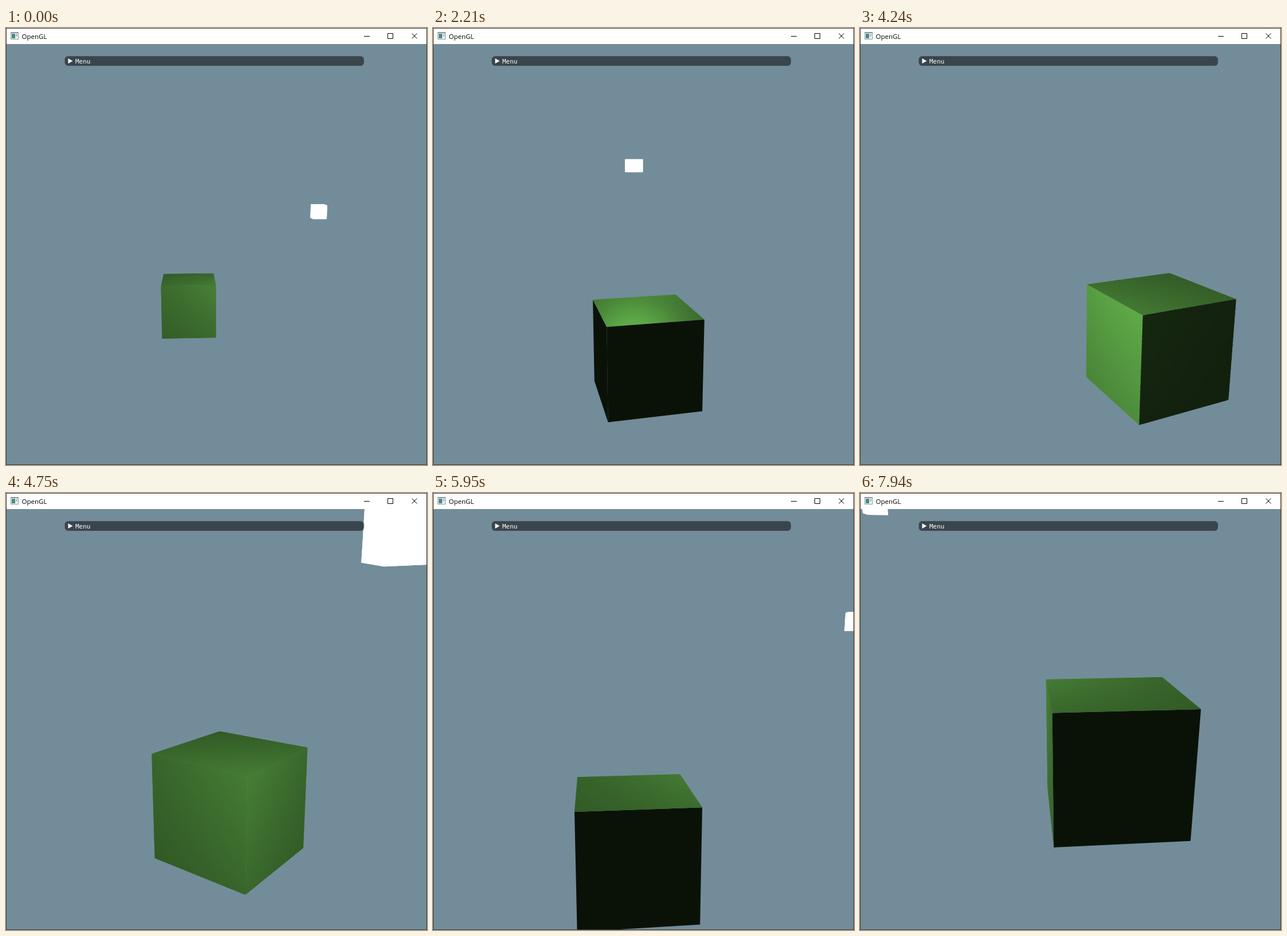
An HTML page with a canvas that plays this animation: 735 px wide and 762 px high, repeating every 7990 ms.

```html
<!DOCTYPE html>
<html>
<head>
<meta charset="utf-8">
<title>OpenGL</title>
<style>
  html, body { margin: 0; width: 100%; height: 100%; overflow: hidden; }
  canvas { display: block; }
</style>
</head>
<body>
<canvas id="stage" width="735" height="762"></canvas>
<script>
const ctx = document.getElementById('stage').getContext('2d');
const LOOP = 7.99, RAD = Math.PI / 180;
const FOCAL = 366.5 / Math.tan(22.5 * RAD), CENTER_X = 367.5, CENTER_Y = 394.5;
const COLOR = [102, 184, 78];
const PATCHES = 22;

// Camera flight: time (s), x, z, height, yaw and pitch (degrees)
const FLIGHT = [
  [0, 0.04, -9.47, 2.776, -3, 10.7],
  [0.85, -0.66, -7.2, 2.42, -4.3, 10.6],
  [1.66, -1.1, -5.35, 2.12, -9.5, 10.5],
  [2.21, -1.233, -5.154, 2.09, -13.28, 10.54],
  [2.44, -1.25, -5.13, 2.09, -16.3, 10.7],
  [2.85, -1.3, -5.1, 2.09, -4.2, 12.5],
  [3.25, -1.33, -5.08, 2.09, -11.5, 13.4],
  [3.54, -1.362, -5.063, 2.089, -12.7, 13.4],
  [4, -2.3, -4.3, 2, -16.9, 13],
  [4.75, -3.566, -2.513, 1.785, -53.1, 12.89],
  [4.88, -3.75, -2, 1.79, -57, 11.2],
  [5.05, -3.95, -1.4, 1.8, -59.8, 9.7],
  [5.35, -4.15, -0.6, 1.81, -88.9, 9],
  [5.7, -4.25, 0.1, 1.815, -91, 9],
  [5.95, -4.271, 0.365, 1.815, -96.03, 9.04],
  [6.4, -4.8, 0.8, 1.93, -104, 10],
  [6.92, -5.474, 1.381, 2.071, -107.4, 16.43],
  [7.38, -4.6, 1.05, 1.75, -100.1, 17.8],
  [7.65, -4.1, 0.85, 1.58, -93.2, 17.3],
  [7.94, -3.684, 0.662, 1.441, -95.06, 17.17]
];

const slope = (i, c) =>
  (FLIGHT[i + 1][c] - FLIGHT[i][c]) / (FLIGHT[i + 1][0] - FLIGHT[i][0]);

// Harmonic mean of neighbouring slopes keeps the curve free of overshoot
function tangent(i, c) {
  if (i === 0) return slope(0, c);
  if (i === FLIGHT.length - 1) return slope(i - 1, c);
  const a = slope(i - 1, c), b = slope(i, c);
  return a * b <= 0 ? 0 : 2 * a * b / (a + b);
}

function cameraAt(time) {
  const last = FLIGHT.length - 1;
  const t = Math.min(time, FLIGHT[last][0]);
  let i = 0;
  while (i < last - 1 && FLIGHT[i + 1][0] <= t) i++;
  const span = FLIGHT[i + 1][0] - FLIGHT[i][0];
  const u = (t - FLIGHT[i][0]) / span, v = 1 - u;
  const [x, z, height, yaw, pitch] = [1, 2, 3, 4, 5].map(c =>
    FLIGHT[i][c] * v * v * (1 + 2 * u) + FLIGHT[i + 1][c] * u * u * (3 - 2 * u) +
    span * u * v * (tangent(i, c) * v - tangent(i + 1, c) * u));
  return {
    position: [x, height, z],
    cosYaw: Math.cos(yaw * RAD), sinYaw: Math.sin(yaw * RAD),
    cosPitch: Math.cos(pitch * RAD), sinPitch: Math.sin(pitch * RAD)
  };
}

function project(camera, p) {
  const [x, y, z] = camera.position;
  const dx = p[0] - x, down = y - p[1], dz = p[2] - z;
  const right = dx * camera.cosYaw + dz * camera.sinYaw;
  const ahead = dz * camera.cosYaw - dx * camera.sinYaw;
  const depth = Math.max(0.05, down * camera.sinPitch + ahead * camera.cosPitch);
  return [
    CENTER_X + FOCAL * right / depth,
    CENTER_Y + FOCAL * (down * camera.cosPitch - ahead * camera.sinPitch) / depth
  ];
}

const subtract = (a, b) => a.map((v, i) => v - b[i]);
const dot = (a, b) => a[0] * b[0] + a[1] * b[1] + a[2] * b[2];
const unit = a => a.map(v => v / Math.hypot(...a));

function tracePolygon(points) {
  ctx.beginPath();
  points.forEach(p => ctx.lineTo(p[0], p[1]));
  ctx.closePath();
}

function shade(point, axis, sign, light, eye) {
  const toLight = unit(subtract(light, point));
  const diffuse = Math.max(0, toLight[axis] * sign);
  const mirrored = toLight.map((v, i) => i === axis ? v : -v);
  const facing = Math.max(0, dot(mirrored, unit(subtract(eye, point))));
  const specular = diffuse > 0 ? 0.5 * facing ** 32 : 0;
  const level = 0.1 + diffuse + specular;
  return `rgb(${COLOR.map(c => Math.min(255, Math.round(c * level)))})`;
}

function drawFace(camera, light, axis, sign) {
  const at = (u, v) => {
    const p = [0, 0, 0];
    p[axis] = sign / 2;
    p[(axis + 1) % 3] = u - 0.5;
    p[(axis + 2) % 3] = v - 0.5;
    return p;
  };
  const quad = (u, v, w, h) =>
    [at(u, v), at(u + w, v), at(u + w, v + h), at(u, v + h)].map(p => project(camera, p));

  tracePolygon(quad(0, 0, 1, 1));
  if (light[axis] * sign <= 0.5) {
    ctx.fillStyle = shade(at(0.5, 0.5), axis, sign, light, camera.position);
    ctx.fill();
    return;
  }
  ctx.save();
  ctx.clip();
  const step = 1 / PATCHES;
  for (let i = 0; i < PATCHES; i++) {
    for (let j = 0; j < PATCHES; j++) {
      const u = i * step, v = j * step;
      ctx.fillStyle = shade(at(u + step / 2, v + step / 2), axis, sign, light, camera.position);
      // Patches overlap a little so that no seams show
      tracePolygon(quad(u - step * 0.2, v - step * 0.2, step * 1.5, step * 1.5));
      ctx.fill();
    }
  }
  ctx.restore();
}

function drawCube(camera, light) {
  for (let axis = 0; axis < 3; axis++) {
    for (const sign of [-1, 1]) {
      if (camera.position[axis] * sign > 0.5) drawFace(camera, light, axis, sign);
    }
  }
}

function orbit(angle, radius, height) {
  return [radius * Math.sin(angle), height, -radius * Math.cos(angle)];
}

function drawLamp(camera, light, angle) {
  const ring = height => [0, 1, 2, 3].map(k => {
    const offset = orbit(angle + k * Math.PI / 2, 0.1 * Math.SQRT2, height);
    return project(camera, light.map((v, i) => v + offset[i]));
  });
  const low = ring(-0.1), high = ring(0.1);
  const sides = low.map((p, k) => [p, low[(k + 1) % 4], high[(k + 1) % 4], high[k]]);
  ctx.fillStyle = '#fff';
  for (const face of [low, high, ...sides]) {
    tracePolygon(face);
    ctx.fill();
  }
}

function drawMenu() {
  ctx.beginPath();
  ctx.roundRect(102.5, 49, 522.5, 17, 6);
  ctx.fillStyle = 'rgba(0,0,0,0.5)';
  ctx.fill();
  ctx.strokeStyle = 'rgba(110,110,128,0.4)';
  ctx.lineWidth = 1;
  ctx.stroke();
  ctx.fillStyle = '#fff';
  tracePolygon([[108.5, 53], [116.5, 57.5], [108.5, 62]]);
  ctx.fill();
  ctx.font = '11px "DejaVu Sans Mono", monospace';
  ctx.fillText('Menu', 121, 61.5);
}

function drawWindowFrame() {
  ctx.fillStyle = '#fff';
  ctx.fillRect(0, 0, 735, 28);

  ctx.fillStyle = '#8a9499';
  ctx.fillRect(8, 7, 14, 13);
  ctx.fillStyle = '#f4f6f6';
  ctx.fillRect(9, 9, 12, 10);
  ctx.fillStyle = '#438a88';
  ctx.fillRect(10, 10, 6, 8);
  ctx.fillStyle = '#b9c4c8';
  ctx.fillRect(17, 10, 3, 5);

  ctx.fillStyle = '#000';
  ctx.font = '11.5px "Open Sans", sans-serif';
  ctx.fillText('OpenGL', 27.5, 18.5);

  ctx.strokeStyle = '#000';
  ctx.lineWidth = 1;
  ctx.beginPath();
  ctx.moveTo(625, 14.5);
  ctx.lineTo(635, 14.5);
  ctx.rect(666.5, 9.5, 9, 9);
  ctx.moveTo(708.5, 9.5);
  ctx.lineTo(717.5, 18.5);
  ctx.moveTo(717.5, 9.5);
  ctx.lineTo(708.5, 18.5);
  ctx.stroke();

  ctx.strokeStyle = '#3a3f42';
  ctx.strokeRect(0.5, 0.5, 734, 761);
}

function draw(time) {
  const camera = cameraAt(time);
  const angle = 43.4 * RAD + Math.min(time, 7.94);
  const light = orbit(angle, 2 * Math.SQRT2, 2);

  ctx.fillStyle = 'rgb(115,140,153)';
  ctx.fillRect(0, 0, 735, 762);
  drawLamp(camera, light, angle);
  drawCube(camera, light);
  drawMenu();
  drawWindowFrame();
}

const start = performance.now();
function tick() {
  draw((performance.now() - start) / 1000 % LOOP);
  requestAnimationFrame(tick);
}
tick();
</script>
</body>
</html>
```
